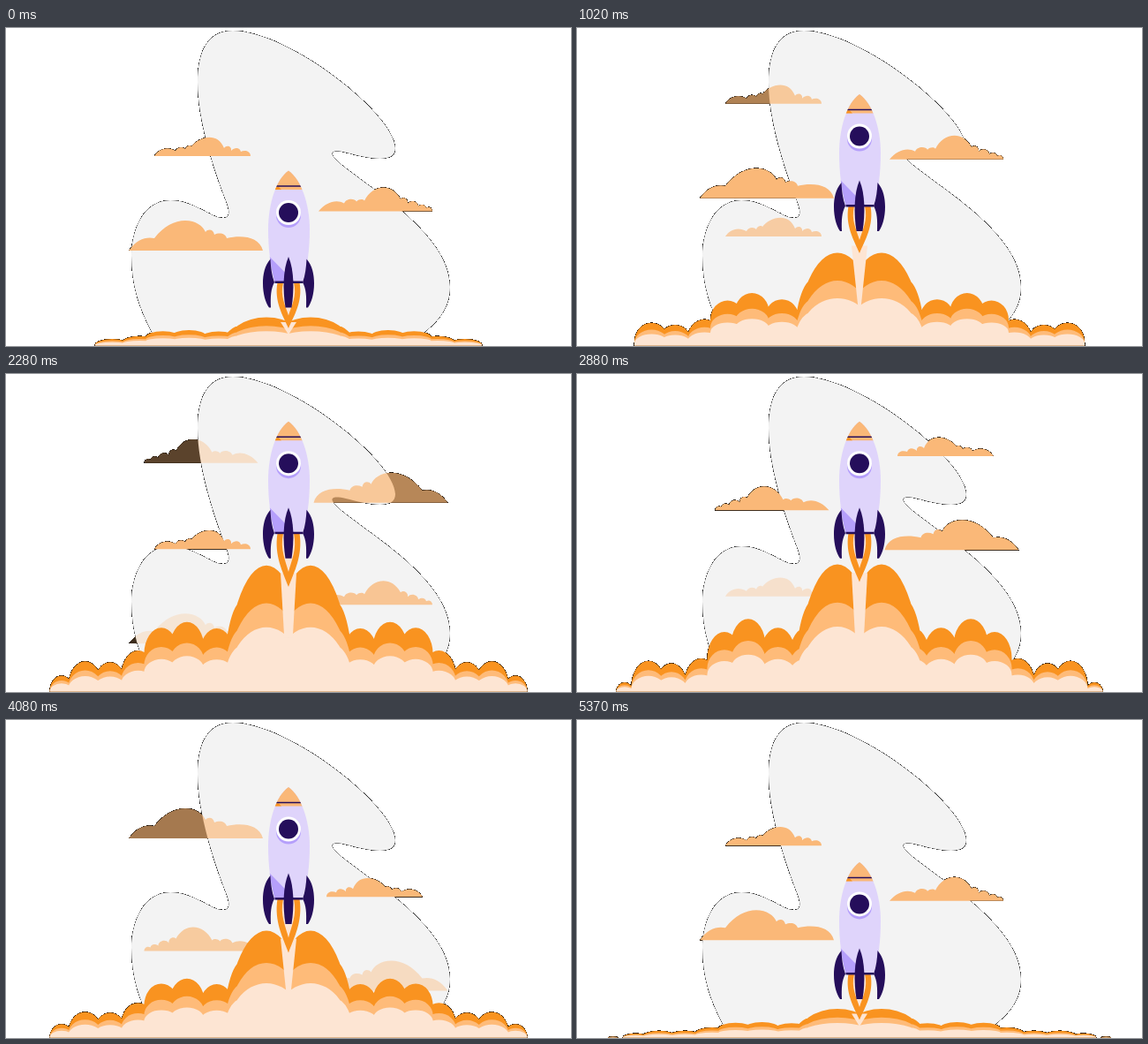
An HTML page with a canvas that plays this animation: 640x360 px, repeating every 5.4 s.

```html
<!DOCTYPE html>
<html lang="en">
<head>
<meta charset="utf-8">
<title>Rocket launch</title>
<style>
  html, body { margin: 0; width: 100%; height: 100%; overflow: hidden; background: #fff; }
  canvas { display: block; }
</style>
</head>
<body>
<canvas id="stage" width="640" height="360"></canvas>
<script>
const LOOP = 5400, HALF = LOOP / 2, GROUND = 359.6;
const ORANGE = '#f99320', PEACH = '#febb79', CREAM = '#fde5d3', CLOUD = '#fab878';
const NAVY = '#250e5b', LILAC = '#dfd4fb', VIOLET = '#b59ffb';
const ctx = document.getElementById('stage').getContext('2d', { willReadFrequently: true });

const blob = new Path2D(`M257 3C320 3 441 98 441 136C441 156 405 146 385 141C372 138 368 140 370 144
  C382 166 503 224 503 293C503 318 488 334 472 346L440 359H175L166 346C150 316 142 290 142 258
  C142 230 155 195 186 195C213 195 232 215 246 215C253 215 254 209 250 198C236 162 217 105 217 62
  C217 25 229 3 257 3Z`);

const small = new Path2D(`M0 0C4 -7 14 -12 24 -6C26 -11 33 -11 35 -8C36 -12 41 -13 42 -11
  C50 -22 72 -28 79 -9C82 -13 88 -11 87 -6C92 -11 97 -9 98 -5C102 -7 109 -6 109 0Z`);
const medium = new Path2D(`M0 0C8 -10 20 -14 29 -9C31 -15 41 -15 43 -11C46 -14 50 -14 52 -12
  C60 -29 82 -34 93 -14C96 -17 102 -14 101 -9C105 -14 113 -11 113 -6C118 -9 121 -7 122 -4C126 -6 129 -3 129 0Z`);
const large = new Path2D(`M0 0C9 -13 20 -16 29 -14C40 -28 52 -34 64 -34C76 -34 84 -28 87 -21
  C90 -25 96 -24 97 -18C103 -21 110 -19 111 -14C128 -18 148 -16 152 0Z`);

// Each cloud: shape, x, facing, height at which it appears, and a known height at a known time
const clouds = [
  [small, 168, 1, 61, 85.7, 1020], [large, 139, 1, 111, 192.7, 1020], [medium, 354, 1, 92, 148.7, 1020],
  [medium, 285.5, -1, 88, 100.7, 2280], [large, 500.5, -1, 120, 145.7, 2280], [small, 472, -1, 54, 146.7, 3480],
  [small, 168, 1, 61, 78, 4650], [large, 139, 1, 111, 185, 4650], [medium, 354, 1, 92, 140.5, 4650]
];
const SPEED = 0.0893, TRAVEL = 206, FADE_IN = 35, FADE_OUT = 48;

// Path followed by the smoke puffs, from the centre outwards
const puffX = [262, 229, 195, 168, 142, 108, 82, 55, 30];
const puffH = [73, 72, 83, 69, 38, 32, 36, 11, 0];

const clamp = v => Math.max(0, Math.min(1, v));

// cubic-bezier(.25, .1, .25, 1)
function ease(x) {
  const curve = (a, b, u) => 3 * a * u * (1 - u) ** 2 + 3 * b * u * u * (1 - u) + u ** 3;
  let lo = 0, hi = 1;
  for (let i = 0; i < 20; i++) {
    const mid = (lo + hi) / 2;
    if (curve(.25, .25, mid) < x) lo = mid; else hi = mid;
  }
  return curve(.1, 1, lo);
}

function sample(list, pos) {
  const i = Math.min(list.length - 2, Math.floor(pos));
  return list[i] + (list[i + 1] - list[i]) * (pos - i);
}

function fill(path, color) {
  ctx.fillStyle = color;
  ctx.fill(typeof path === 'string' ? new Path2D(path) : path);
}

function disc(x, y, r, color) {
  const p = new Path2D();
  p.arc(x, y, r, 0, 7);
  fill(p, color);
}

function drawClouds(t) {
  for (const [shape, x, facing, top, y0, t0] of clouds) {
    for (const time of [t, t + LOOP]) {
      const y = y0 + SPEED * (time - t0), gone = y - top;
      if (gone <= 0 || gone >= TRAVEL) continue;
      ctx.save();
      ctx.globalAlpha = clamp(gone / FADE_IN) * clamp((TRAVEL - gone) / FADE_OUT);
      ctx.translate(x, y);
      ctx.scale(facing, 1);
      fill(shape, CLOUD);
      ctx.restore();
    }
  }
}

function drawSmoke(t, grow) {
  const scale = (32 + 112.5 * grow) / 144.5;
  // Each bump: x, height, half width, height of its rounded cap
  const bumps = [[295, 144.5, 46, 144.5], [268, 104, 22, 104]];
  const drift = t * 12 / LOOP + 0.64;
  for (let pos = drift % 1 - 1; pos < 7; pos++) {
    if (pos > 3.7 + 0.0018 * t) break;
    const h = sample(puffH, pos + 1);
    if (h > 4) bumps.push([sample(puffX, pos + 1), h, Math.min(19.5, 2.35 * h ** 0.6), Math.min(h, 30)]);
  }
  for (const [color, k] of [[ORANGE, 1], [PEACH, .7], [CREAM, .51]]) {
    const p = new Path2D(), size = scale * k;
    for (const [x, h, rx, cap] of bumps) {
      for (const cx of [x, 640 - x]) {
        p.moveTo(cx - rx, GROUND);
        p.ellipse(cx, GROUND - (h - cap) * size, rx, cap * size, 0, Math.PI, 2 * Math.PI);
        p.lineTo(cx + rx, GROUND);
        p.closePath();
      }
    }
    fill(p, color);
  }
  return 360 - 62 * scale;
}

function drawTrail(top, bottom, grow) {
  const w = 0.5 + 4.5 * grow ** 3;
  fill(`M311 ${top}H329L${320 + w} ${bottom}H${320 - w}Z`, CREAM);
}

function drawFlame(x, len, color) {
  const end = 288 + len, w = 320 - x;
  fill(`M${x} 288C${x - 4} ${288 + len * .42} ${320 - w * .5} ${288 + len * .72} 320 ${end}
    C${320 + w * .5} ${288 + len * .72} ${320 + w + 4} ${288 + len * .42} ${320 + w} 288Z`, color);
}

function drawRocket(t, lift) {
  const len = 56.5 - 4.5 * Math.cos(2 * Math.PI * t / 900);
  ctx.save();
  ctx.translate(0, -lift);
  drawFlame(307.5, len, ORANGE);
  drawFlame(314, len * .72, CREAM);

  const body = new Path2D('M320 161.5C306 171 297 199 297 228C297 252 300 272 304.5 288H336C341 272 344 252 344 228C344 199 334 171 320 161.5Z');
  fill(body, LILAC);
  ctx.save();
  ctx.clip(body);
  fill('M290 155H350V183H290Z', CLOUD);
  fill('M290 180H309L312 183H290Z', ORANGE);
  fill('M290 178.3H350V179.8H290Z', NAVY);
  fill('M290 250L327 288H290Z', VIOLET);
  ctx.restore();

  disc(320, 212, 14, VIOLET);
  disc(320, 209, 14, '#fff');
  disc(320, 209, 11, NAVY);
  fill('M304.5 286.500H336V289H304.500Z', NAVY);
  const fin = new Path2D('M299.5 261.5C293 269 291 279 291 289C291 301 294 311 298 316.5H300C299.5 304 300 295 304 288C301 280 300 271 299.5 261.5Z');
  fill(fin, NAVY);
  ctx.save();
  ctx.translate(640, 0);
  ctx.scale(-1, 1);
  fill(fin, NAVY);
  ctx.restore();
  fill('M320 259C313.5 274 313.5 297 316.5 316.5H323.5C326.5 297 326.5 274 320 259Z', NAVY);
  ctx.restore();
}

// Partly covered pixels become solid, mixed with black
function hardenEdges() {
  const img = ctx.getImageData(0, 0, 640, 360), d = img.data;
  for (let i = 0; i < d.length; i += 4) {
    const a = d[i + 3];
    if (a === 0 || a === 255) continue;
    for (let c = 0; c < 3; c++) d[i + c] *= a / 255;
    d[i + 3] = a < 24 ? 0 : 255;
  }
  ctx.putImageData(img, 0, 0);
}

function draw(t) {
  const p = t / HALF;
  const grow = ease(p < 1 ? p : 2 - p);
  const lift = 108 * (p < 1 ? 1 - (1 - p) ** 3.4 : grow);
  ctx.clearRect(0, 0, 640, 360);
  fill(blob, '#f3f3f3');
  drawClouds(t);
  const smokeTop = drawSmoke(t, grow);
  drawTrail(Math.min(333 - lift, smokeTop - 5), smokeTop, grow);
  drawRocket(t, lift);
  hardenEdges();
}

const start = performance.now();
function tick() {
  const t = (performance.now() - start) % LOOP;
  draw(Math.floor(t / 30) * 30);
  requestAnimationFrame(tick);
}
tick();
</script>
</body>
</html>
```
